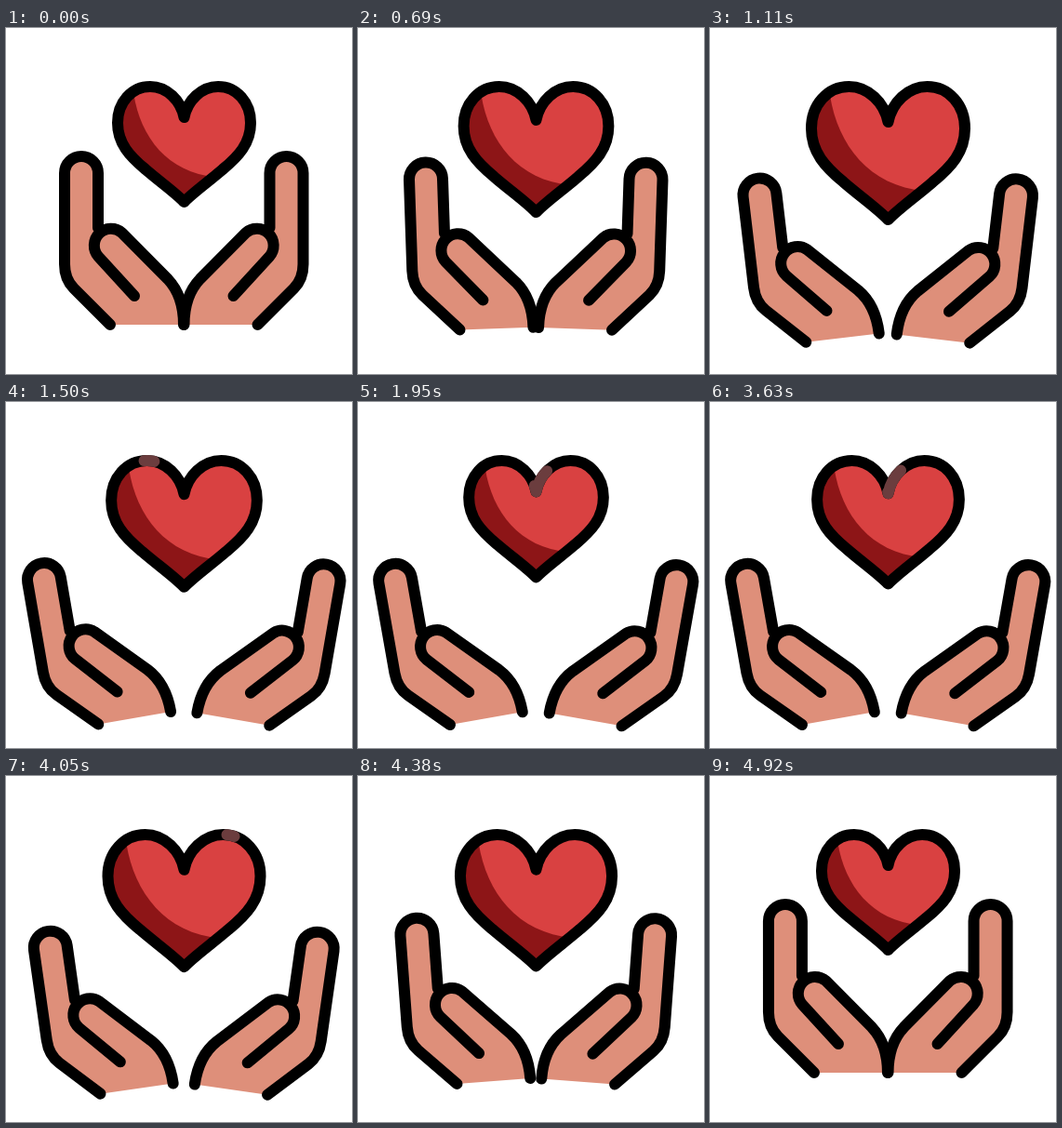
Write an HTML page with a canvas that moves like this. It is 372 px wide and 372 px high and loops after 5.43 s.

```html
<!DOCTYPE html>
<html lang="en">
<head>
<meta charset="utf-8">
<title>Caring hands</title>
<style>
html, body { margin: 0; width: 100%; height: 100%; overflow: hidden; background: #fff; }
canvas { display: block; }
</style>
</head>
<body>
<canvas id="stage" width="372" height="372"></canvas>
<script>
const ctx = document.getElementById('stage').getContext('2d');
const LOOP = 5430, STEP = 30, LINE = 12;
const SKIN = '#de8f7a', RED = '#d94141', DARK_RED = '#8d1517', GLINT = '#6b3d3e';

const heartData = 'M191.5 96C195 78 210 63 228 63C248 63 263 80 263 102' +
  'C263 124 250 138 233 152C218 165 201 177 191.5 187' +
  'C182 177 165 165 150 152C133 138 120 124 120 102C120 80 135 63 155 63C173 63 188 78 191.5 96Z';
const heart = new Path2D(heartData);
const heartLight = new Path2D('M136 60C140 108 166 150 216 159H290V50H136Z');

const fingers = 'M112 319L73 280Q63 270 63 254V156A18 18 0 0 1 99 156V215';
const thumb = 'A18 18 0 0 1 124.7 220.3L174 270Q191 288 191 319';
const palm = new Path2D(fingers + 'L99.3 245.7' + thumb + 'Z');
const handLines = new Path2D(fingers + 'M138 288L99.3 245.7' + thumb);

const measure = document.createElementNS('http://www.w3.org/2000/svg', 'path');
measure.setAttribute('d', heartData);
const heartLength = measure.getTotalLength();

const clamp = (v, lo, hi) => Math.min(hi, Math.max(lo, v));
const ease = (t, from, to) =>
  (1 - Math.cos(Math.PI * clamp((t - from) / (to - from), 0, 1))) / 2;

const openness = t => ease(t, 310, 1620) - ease(t, 3685, 4955);
const swelling = t => ease(t, 310, 1010) - ease(t, 1010, 2150) +
  ease(t, 3120, 4230) - ease(t, 4230, 4950);
// Position along the heart outline, in turns clockwise from the cleft.
const glintAt = t => -0.128 + 1.27 * ease(t, 1400, 4260);

function drawHand(open, drop, mirrored) {
  ctx.save();
  if (mirrored) {
    ctx.translate(382.5, 0);
    ctx.scale(-1, 1);
  }
  ctx.translate(112 - 13 * open, 319 + drop * open);
  ctx.rotate(-open * Math.PI / 18);
  ctx.translate(-112, -319);
  ctx.fillStyle = SKIN;
  ctx.fill(palm);
  ctx.lineWidth = LINE;
  ctx.strokeStyle = '#000';
  ctx.stroke(handLines);
  ctx.restore();
}

function drawHeart(t) {
  const size = 1 + 0.157 * swelling(t);
  ctx.save();
  ctx.translate(191.5, 63);
  ctx.scale(size, size);
  ctx.translate(-191.5, -63);

  ctx.fillStyle = DARK_RED;
  ctx.fill(heart);
  ctx.save();
  ctx.clip(heart);
  ctx.fillStyle = RED;
  ctx.fill(heartLight);
  ctx.restore();

  ctx.lineWidth = LINE / size;
  ctx.strokeStyle = '#000';
  ctx.stroke(heart);

  const tail = glintAt(t) * heartLength;
  const length = glintAt(t + 160) * heartLength - tail;
  if (length > 0.5) {
    ctx.setLineDash([length, heartLength - length]);
    ctx.lineDashOffset = -tail;
    ctx.strokeStyle = GLINT;
    ctx.stroke(heart);
  }
  ctx.restore();
}

function draw(t) {
  ctx.fillStyle = '#fff';
  ctx.fillRect(0, 0, 372, 372);
  ctx.lineCap = ctx.lineJoin = 'round';
  const open = openness(t);
  drawHand(open, 28, false);
  drawHand(open, 29.3, true);
  drawHeart(t);
}

const start = performance.now();
function tick() {
  const t = (performance.now() - start) % LOOP;
  draw(Math.floor(t / STEP) * STEP);
  requestAnimationFrame(tick);
}
tick();
</script>
</body>
</html>
```
